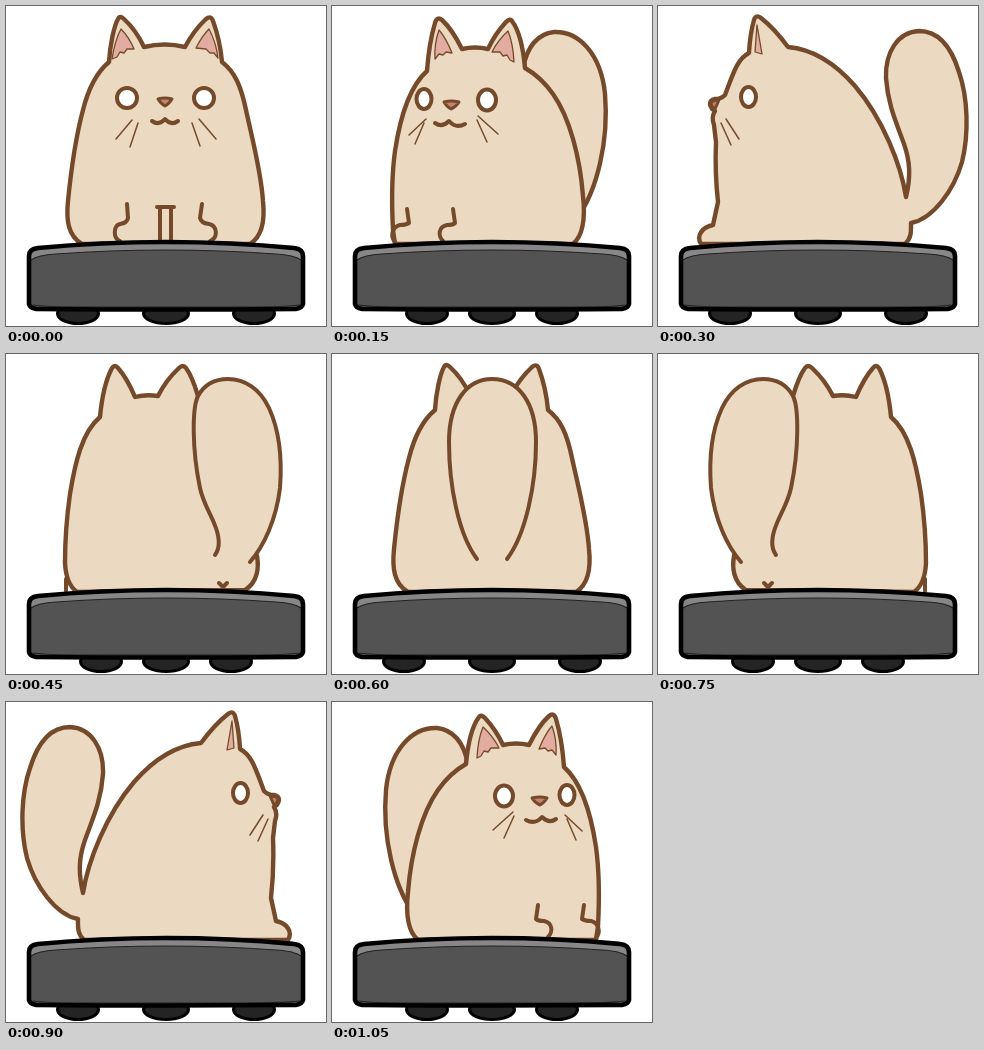
An HTML page that plays this animation: 320x320 px, repeating every 1200 ms.

```html
<!DOCTYPE html>
<html lang="en">
<head>
<meta charset="utf-8">
<title>Spinning cat</title>
<style>
  html, body { margin: 0; width: 100%; height: 100%; overflow: hidden; background: #fff; }
  svg { display: block; width: 100%; height: 100%; }
  .fur { fill: #ebd9c2; stroke: #754a2b; stroke-width: 4.4; }
  .patch { fill: #ebd9c2; }
  .line { fill: none; stroke: #754a2b; stroke-width: 4; }
  .thin { fill: none; stroke: #754a2b; stroke-width: 1.5; }
  .ear { fill: #e3aca1; stroke: #754a2b; stroke-width: 1.3; }
  .eye { fill: #fff; stroke: #754a2b; stroke-width: 4; }
  .nose { fill: #c98272; stroke: #754a2b; stroke-width: 3; }
  .wheel { fill: #242424; stroke: #000; stroke-width: 3; }
  .rim { fill: none; stroke: #000; stroke-width: 4.6; }
</style>
</head>
<body>
<svg viewBox="0 0 320 320" stroke-linecap="round" stroke-linejoin="round">
  <defs>
    <path id="base" d="M23 250Q23 243 32 242Q95 236 160 236Q225 236 288 242Q297 243 297 250V298Q296 302 290 303Q160 304 30 303Q24 302 23 298Z"/>
  </defs>
  <g id="cat"></g>
  <g id="wheels"></g>
  <use href="#base" fill="#535353"/>
  <path fill="#898687" d="M25 254Q24 244 32 242Q95 236 160 236Q225 236 288 242Q296 244 295 254Q288 249 270 248Q215 244 160 244Q105 244 50 248Q32 249 25 254Z"/>
  <path fill="none" stroke="#222" stroke-width="1.2" d="M25 254Q32 249 50 248Q105 244 160 244Q215 244 270 248Q288 249 295 254M27 299Q40 301 80 301H240Q280 301 293 299"/>
  <use href="#base" class="rim"/>
</svg>
<script>
const STEP = 150;

const path = (kind, d) => `<path class="${kind}" d="${d}"/>`;
const eye = (x, y, rx, ry) => `<ellipse class="eye" cx="${x}" cy="${y}" rx="${rx}" ry="${ry}"/>`;
const mirror = (art, width) => `<g transform="translate(${width} 0) scale(-1 1)">${art}</g>`;

const sitting = 'M76 238C62 230 60 214 62 195C65 165 70 130 77 104C83 80 91 66 103 56C104 39 108 20 112 13Q114 9 118 13Q130 24 138 41Q159 36 179 41Q188 24 200 13Q205 9 207 15Q214 34 216 56C229 66 235 80 240 104C246 132 255 165 257 195C259 214 257 230 244 238Z';

const front = path('fur', sitting)
  + path('ear', 'M106 53Q109 34 115 23Q123 31 128 43L121 43L118 47L114 46L111 51Z')
  + path('ear', 'M190 42Q196 30 203 23Q210 36 212 52L208 47L204 47L200 43Z')
  + eye(121, 92, 10, 10) + eye(198, 92, 10, 10)
  + path('nose', 'M152 93Q159 91 166 93Q163 98 159 100Q155 98 152 93Z')
  + path('line', 'M146 115Q153 120 159 113Q165 120 172 115')
  + path('thin', 'M126 114L110 133M132 117L124 141M193 113L210 133M186 117L194 140')
  + path('line', 'M121 198L122 212Q121 217 114 218C107 220 107 232 114 235M151 201H168M154 201V237M165 201V237M196 198L194 212Q195 217 203 218C212 220 212 232 204 235');

const quarter = path('fur', 'M82 212C62 185 50 135 54 88C58 48 80 25 105 26C122 28 132 42 136 62L120 150Z')
  + path('fur', 'M86 238C74 228 74 208 76 190C79 152 89 112 106 88Q118 71 134 62C136 40 141 23 147 15Q149 12 153 16Q164 28 171 43Q184 40 197 43Q207 23 217 14Q222 10 224 17Q230 37 232 65C249 80 259 112 264 145C268 174 267 205 266 224L264 238Z')
  + path('ear', 'M145 56Q146 37 151 25Q161 34 167 46L159 46L156 50L152 49L149 54Z')
  + path('ear', 'M207 47Q213 32 220 24Q225 38 224 53L220 48L216 49L213 46Z')
  + eye(172, 94, 9, 10.5) + eye(235, 93, 7.5, 10)
  + path('nose', 'M200 96Q208 94 215 96Q212 101 208 103Q203 101 200 96Z')
  + path('line', 'M194 118Q203 123 210 115Q217 122 224 117')
  + path('thin', 'M181 110L161 128M182 114L172 136M233 113L250 129M235 117L244 138')
  + path('line', 'M206 203L204 217Q206 219 212 219C221 221 221 230 216 235M252 203L250 217Q253 219 259 219C267 221 269 230 264 236');

const side = path('fur', 'M78 238C71 232 72 224 72 217C50 213 29 184 21 156C14 128 15 92 24 66C32 40 45 25 64 25C85 26 98 46 97 72C95 100 86 118 79 138C73 155 72 170 77 191C82 159 100 113 128 80C149 56 172 43 195 41Q209 22 222 12Q227 8 229 14Q233 28 234 47C246 53 250 68 258 89Q262 93 268 93Q273 94 273 98Q272 103 268 105Q272 111 269 119L267 136C268 160 267 178 265 196L270 219C281 221 287 230 282 238Z')
  + path('ear', 'M221 48L226 19L228 46Z')
  + eye(234.5, 91, 7.5, 10)
  + path('nose', 'M264 94Q270 94 272 97Q271 102 268 103Z')
  + path('thin', 'M257 113L244 133M262 117L252 139');

const tail = 'M83 208C69 192 57 166 53 134C51 108 53 78 64 54C73 35 88 25 105 25C120 25 129 31 135 42C141 54 141 96 133 134C130 148 124 157 119 169Q110 190 118 201';
const backQuarter = path('line', 'M267 225V237')
  + path('fur', 'M88 236C75 228 74 213 76 202L135 42Q141 22 147 14Q150 10 154 14Q167 26 175 42Q187 40 198 43Q206 24 215 14Q218 10 221 14Q230 31 233 63C251 78 258 109 263 140C267 168 268 188 268 209Q267 230 256 238Z')
  + path('patch', tail) + path('line', tail)
  + path('line', 'M106 229L110 233L114 229M110 233V237');

const backTail = 'M145 205C126 180 117 130 117 88C117 48 135 25 160 25C186 25 204 48 204 88C204 130 194 180 175 205';
const back = path('fur', sitting) + path('patch', backTail) + path('line', backTail);

const poses = [
  front, mirror(quarter, 327), mirror(side, 325), mirror(backQuarter, 327),
  back, backQuarter, side, quarter
];

const wheel = (x, rx) => `<ellipse class="wheel" cx="${x}" cy="307.5" rx="${rx}" ry="10"/>`;
const wheelSet = spread => wheel(160 - spread, 20.5) + wheel(160, 22.5) + wheel(160 + spread, 20.5);

const cat = document.getElementById('cat');
const wheels = document.getElementById('wheels');
const start = performance.now();
let shown = -1;

function draw(now) {
  const step = Math.floor(Math.max(0, now - start) / STEP) % poses.length;
  if (step !== shown) {
    shown = step;
    cat.innerHTML = poses[step];
    wheels.innerHTML = wheelSet(step % 2 ? 65 : 88);
  }
  requestAnimationFrame(draw);
}
draw(start);
</script>
</body>
</html>
```
